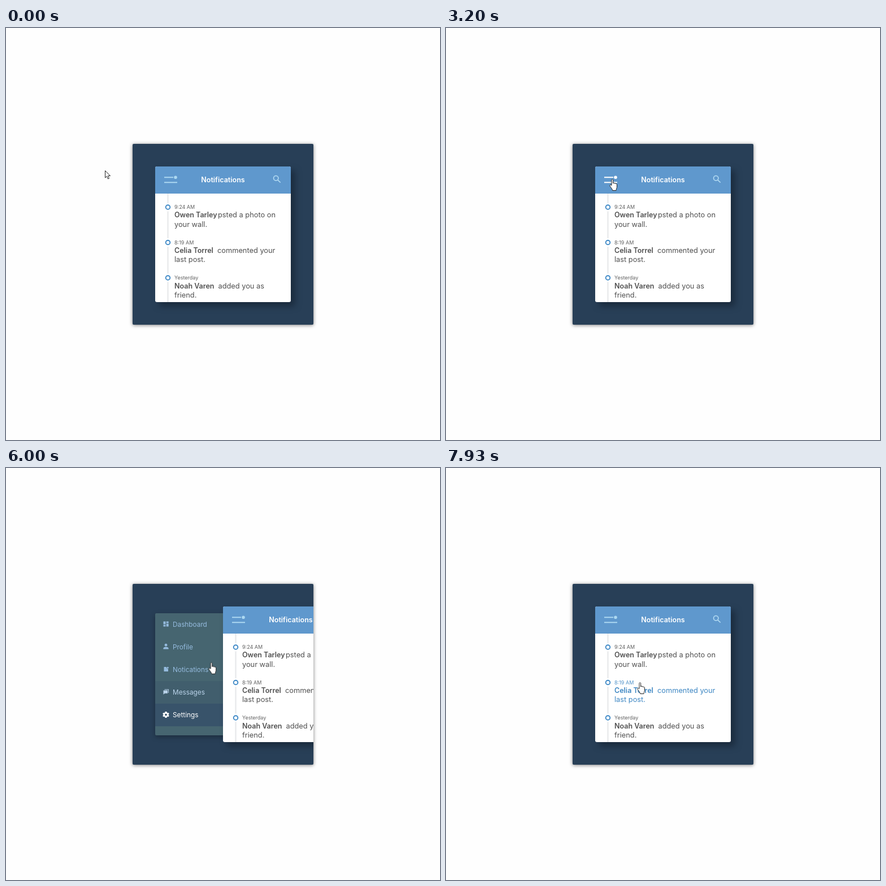
These frames come from a looping animation (768x729 px, 8 s). An HTML page:

```html
<!DOCTYPE html>
<html lang="en">
<head>
<meta charset="utf-8">
<title>Notifications</title>
<style>
html, body { margin: 0; width: 100%; height: 100%; overflow: hidden; background: #fefefe; }
svg { display: block; font-family: Inter, "Open Sans", sans-serif; }
svg * { animation: 8s linear infinite; }

.card { fill: #283f57; filter: drop-shadow(0 1px 3px rgba(0, 0, 0, .5)); }
.sheet { fill: #fff; filter: drop-shadow(7px 7px 6px rgba(12, 22, 34, .5)); }
.title { font-size: 12.5px; font-weight: 600; fill: #fff; text-anchor: middle; }
.hint { font: 10.67px "Liberation Sans", Arial, sans-serif; fill: #555; }

/* side menu */
.menu { font-size: 11.8px; fill: #95bbde; animation-name: menu; animation-timing-function: ease; }
.back { fill: #466570; filter: drop-shadow(0 3px 4px rgba(0, 0, 0, .3)); }
.on { fill: #fff; opacity: 0; }
.on rect.bg { fill: #38536a; }
.on1 { animation-name: on1; } .on2 { animation-name: on2; } .on3 { animation-name: on3; }
.on4 { animation-name: on4; } .on5 { animation-name: on5; }

/* front panel */
.panel { animation-name: panel; animation-timing-function: ease; }
.burger { color: #acd8f1; animation-name: burger; }
.lens { color: #b4dcf3; fill: none; stroke: currentColor; stroke-width: 1.6; animation-name: lens; }
.field { animation-name: field; animation-timing-function: ease; }
.item { font-size: 12.8px; fill: #505050; }
.item .time { font-size: 9px; opacity: .9; }
.item .who { font-size: 12.5px; font-weight: 600; }
.item1 { animation-name: item1; } .item2 { animation-name: item2; }
.dot { fill: #fff; stroke: #3d88c6; stroke-width: 1.9; }

/* pointer */
.pointer { fill: #fff; stroke: #222; stroke-width: 1; stroke-linejoin: round; animation-name: move; }
.arrow { animation-name: arrow; animation-timing-function: step-end; }
.hand { animation-name: hand; animation-timing-function: step-end; }

@keyframes panel {
  0%, 40.875%, 90%, 100% { transform: translateX(0); }
  47.75%, 83.125% { transform: translateX(120px); }
}
@keyframes menu {
  0%, 40.875%, 90%, 100% { transform: translateX(16px); }
  47.75%, 83.125% { transform: translateX(0); }
}
@keyframes field {
  0%, 11.8%, 32.4%, 100% { clip-path: inset(0 0 0 100% round 14px); opacity: 0; }
  18.2%, 26% { clip-path: inset(0 0 0 0% round 14px); opacity: 1; }
}
@keyframes burger {
  0%, 34%, 42.5%, 45.5%, 80.2%, 86.5%, 89.5%, 100% { color: #acd8f1; }
  36.5%, 42%, 82.5%, 86% { color: #fff; }
}
@keyframes lens {
  0%, 9%, 30%, 100% { color: #b4dcf3; }
  12%, 27% { color: #fff; }
}
@keyframes on1 { 0%, 42.5%, 59.5%, 100% { opacity: 0; } 45.5%, 56% { opacity: 1; } }
@keyframes on2 { 0%, 56.2%, 65%, 100% { opacity: 0; } 59.5%, 61.5% { opacity: 1; } }
@keyframes on3 { 0%, 61.5%, 68%, 75.1%, 80%, 100% { opacity: 0; } 64.5%, 65% { opacity: 1; } 77% { opacity: .6; } }
@keyframes on4 { 0%, 64.8%, 71%, 73.8%, 78%, 100% { opacity: 0; } 67.5%, 68% { opacity: 1; } 75% { opacity: .35; } }
@keyframes on5 { 0%, 67.8%, 79%, 100% { opacity: 0; } 71%, 75.1% { opacity: 1; } }
@keyframes item1 { 0%, 91.5%, 98.8%, 100% { fill: #505050; } 93.4%, 96% { fill: #3e87c3; } }
@keyframes item2 { 0%, 96%, 100% { fill: #505050; } 98.8%, 99.9% { fill: #3e87c3; } }

@keyframes move {
  0%, .875% { transform: translate(175px, 252px); }
  5% { transform: translate(330px, 290px); animation-timing-function: ease-out; }
  10%, 11.625% { transform: translate(486px, 262px); }
  20%, 23.25% { transform: translate(479px, 262px); }
  24% { transform: translate(477px, 262px); }
  25.875% { transform: translate(477px, 262px); animation-timing-function: ease-in-out; }
  35.875% { transform: translate(291px, 269px); }
  39.5%, 46.625% { transform: translate(289px, 267px); }
  55.875% { transform: translate(313px, 316px); }
  68.375% { transform: translate(366px, 425px); }
  70%, 73.375% { transform: translate(362px, 432px); }
  75% { transform: translate(358px, 344px); }
  77.5% { transform: translate(382px, 292px); }
  81.25%, 83.125% { transform: translate(402px, 264px); }
  85% { transform: translate(396px, 268px); }
  93.375%, 95% { transform: translate(330px, 332px); }
  99%, 100% { transform: translate(338px, 379px); }
}
@keyframes hand {
  0%, 27%, 87% { opacity: 0; }
  9%, 33.5%, 91%, 100% { opacity: 1; }
}
@keyframes arrow {
  0%, 27%, 87% { opacity: 1; }
  9%, 33.5%, 91%, 100% { opacity: 0; }
}
</style>
</head>
<body>
<svg width="768" height="729" viewBox="0 0 768 729">
  <defs>
    <clipPath id="stage"><rect x="224" y="205" width="320" height="320" rx="2"/></clipPath>
    <clipPath id="sheet"><rect x="264" y="245" width="240" height="240" rx="3"/></clipPath>
  </defs>

  <rect class="card" x="224" y="205" width="320" height="320" rx="2"/>

  <g clip-path="url(#stage)">
    <g class="menu">
      <rect class="back" x="264" y="257" width="180" height="216" rx="2"/>
      <g transform="translate(264 257)">
        <g id="row1">
          <path d="M14.5 14.5h4v5h-4zM14.5 20.5h4v3h-4zM19.7 14.5h4v3h-4zM19.7 18.5h4v5h-4z"/>
          <text x="31" y="24">Dashboard</text>
        </g>
        <g class="on on1"><rect class="bg" width="180" height="40"/><use href="#row1"/></g>
      </g>
      <g transform="translate(264 297)">
        <g id="row2">
          <circle cx="19" cy="16.2" r="2.4"/>
          <path d="M14.4 23.5v-1.2c0-3.6 9.2-3.6 9.2 0v1.2z"/>
          <text x="31" y="24">Profile</text>
        </g>
        <g class="on on2"><rect class="bg" width="180" height="40"/><use href="#row2"/></g>
      </g>
      <g transform="translate(264 337)">
        <g id="row3">
          <path d="M15.5 15h4.3c0 2.2 1.4 3.5 3.2 3.5v4.500h-7.500z"/>
          <circle cx="22.2" cy="16.200" r="1.5"/>
          <text x="31" y="24">Notications</text>
        </g>
        <g class="on on3"><rect class="bg" width="180" height="40"/><use href="#row3"/></g>
      </g>
      <g transform="translate(264 377)">
        <g id="row4">
          <path d="M16.500 14.500h7.500v6.500h-1v-5.400h-6.500z"/>
          <path d="M14.500 16.500h7.500v5.200h-5l-2.500 2z"/>
          <text x="31" y="24">Messages</text>
        </g>
        <g class="on on4"><rect class="bg" width="180" height="40"/><use href="#row4"/></g>
      </g>
      <g transform="translate(264 417)">
        <g id="row5">
          <path fill-rule="evenodd" d="M17.600 14h2.800l.4 1.600 1.300.8 1.600-.5 1 2.100-1.200 1.200v.800l1.200 1.200-1 2.100-1.600-.5-1.300.8-.4 1.400h-2.800l-.4-1.400-1.300-.8-1.600.5-1-2.100 1.200-1.200v-.8l-1.200-1.200 1-2.100 1.600.5 1.300-.8zM19 17.700a1.800 1.800 0 1 0 .01 0z"/>
          <text x="31" y="24">Settings</text>
        </g>
        <g class="on on5"><rect class="bg" width="180" height="40"/><use href="#row5"/></g>
      </g>
    </g>

    <g class="panel">
      <rect class="sheet" x="264" y="245" width="240" height="240" rx="3"/>
      <g clip-path="url(#sheet)">
        <rect x="264" y="245" width="240" height="48" fill="#5f98cd"/>
        <g class="burger">
          <path d="M280 264.300h16M280 273.300h23" stroke="currentColor" stroke-width="1.900"/>
          <circle cx="300" cy="264.300" r="2.800" fill="currentColor"/>
        </g>
        <text class="title" x="384" y="273">Notifications</text>
        <g class="field">
          <rect x="276" y="255" width="184" height="27" rx="13.5" fill="#fff"/>
          <text class="hint" x="289" y="272">Search...</text>
        </g>
        <g class="lens">
          <circle cx="477.700" cy="265.700" r="4.200"/>
          <path d="M480.800 268.800l4.900 4.700"/>
        </g>

        <path d="M286.500 293v192" stroke="#e9eaec" stroke-width="2.400"/>
        <g class="item item1">
          <circle cx="286.500" cy="317" r="7.500" fill="#fff"/>
          <circle class="dot" cx="286.500" cy="317" r="3.800"/>
          <text class="time" x="298" y="320">9:24 AM</text>
          <text y="335"><tspan class="who" x="298">Owen Tarley</tspan><tspan x="375">psted a photo on</tspan></text>
          <text x="298" y="351.500">your wall.</text>
        </g>
        <g class="item item2">
          <circle cx="286.500" cy="379.500" r="7.500" fill="#fff"/>
          <circle class="dot" cx="286.500" cy="379.500" r="3.800"/>
          <text class="time" x="298" y="382.500">8:19 AM</text>
          <text y="398"><tspan class="who" x="298">Celia Torrel</tspan><tspan x="374">commented your</tspan></text>
          <text x="298" y="414">last post.</text>
        </g>
        <g class="item">
          <circle cx="286.500" cy="442" r="7.500" fill="#fff"/>
          <circle class="dot" cx="286.500" cy="442" r="3.800"/>
          <text class="time" x="298" y="445">Yesterday</text>
          <text y="460.500"><tspan class="who" x="298">Noah Varen</tspan><tspan x="375.500">added you as</tspan></text>
          <text x="298" y="476.500">friend.</text>
        </g>
      </g>
    </g>
  </g>

  <g class="pointer">
    <path class="arrow" d="M.5.5V13l2.900-2.700 2 4.700 2.100-.9-2-4.500h4z"/>
    <path class="hand" d="M4 11.500V2.200C4 .2 6.700.2 6.700 2.200V8C6.700 6.500 9.200 6.700 9.200 8.300 9.200 7.100 11.500 7.300 11.500 9 11.600 8 13.500 8.200 13.500 10v4c0 2.500-1.400 3.500-1.500 6.500H5.800C5.200 17.500 2.800 15.500 1 12.400.2 10.600 2.300 9.700 4 11.500z"/>
  </g>
</svg>
</body>
</html>
```
